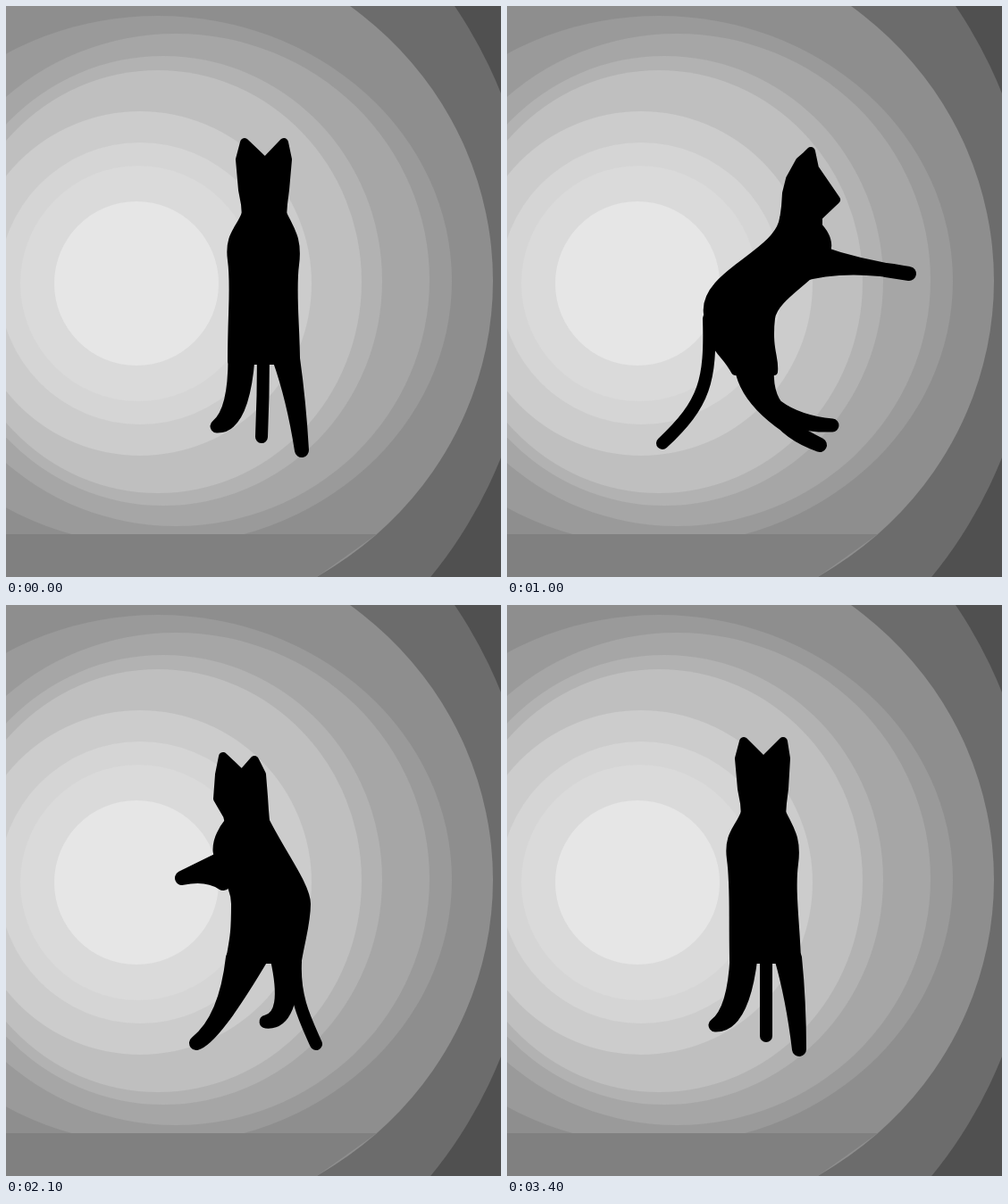
An HTML page without scripts that plays this animation: 554 px wide and 640 px high, repeating every 3500 ms.

```html
<!DOCTYPE html>
<html lang="en">
<head>
<meta charset="utf-8">
<title>Turning cat</title>
<style>
html, body { margin: 0; width: 100%; height: 100%; overflow: hidden; background: #505050; }
svg { display: block; width: 100vw; height: 100vh; }
.cat { fill: #000; stroke: #000; stroke-linejoin: round; stroke-linecap: round; }
/* steps() keeps the 100 ms cadence between poses */
.cat path { animation: 3.5s steps(4) -10ms infinite; }
.cat .head { stroke-width: 10; animation-name: head; }
.cat .torso { stroke-width: 8; animation-name: torso; }
.cat .arm { stroke-width: 16; animation-name: arm; }
.cat .near { stroke-width: 16; animation-name: near; }
.cat .far { stroke-width: 15; animation-name: far; }
.cat .tail { stroke-width: 14; fill: none; animation-name: tail; }

@keyframes head {
  11.4286% { d: path("M293,236 294,222 294,208 298,182 306,154 321,173 337,159 341,182 350,207 335,230 334,242Z"); animation-timing-function: steps(3); }
  20% { d: path("M303,238 305,223 306,209 309,188 318,160 328,170 340,159 342,183 364,212 346,233 346,244Z"); animation-timing-function: steps(3); }
  28.5714% { d: path("M310,240 312,225 313,210 317,194 328,174 335,168 340,163 344,182 368,217 348,236 348,246Z"); }
  40% { d: path("M288,240 288,227 288,214 288,194 294,177 310,190 329,168 332,188 342,217 326,234 324,243Z"); animation-timing-function: steps(1); }
  45.7143% { d: path("M283,240 282,228 282,215 282,195 289,175 305,192 325,171 329,190 330,216 321,233 319,242Z"); animation-timing-function: steps(5); }
  60% { d: path("M250,244 248,236 237,217 239,190 243,170 264,190 278,174 286,190 288,215 289,230 290,242Z"); animation-timing-function: steps(3); }
  68.5714% { d: path("M236,246 234,236 213,214 229,188 236,164 248,178 262,162 271,184 275,209 276,224 278,238Z"); animation-timing-function: steps(2); }
  74.2857% { d: path("M231,246 229,235 206,212 230,187 236,164 241,168 252,158 261,182 268,207 270,222 272,236Z"); animation-timing-function: steps(3); }
  82.8571% { d: path("M232,246 230,234 212,208 231,184 236,161 246,171 254,156 263,180 269,205 270,220 272,236Z"); animation-timing-function: steps(5); }
  97.1429% { d: path("M267,236 266,222 263,206 260,172 265,153 287,175 309,153 312,172 310,206 308,222 307,236Z"); animation-timing-function: steps(1); }
}
@keyframes torso {
  11.4286% { d: path("M293,230C286,272 236,290 234,335S236,375 243,395L322,405C318,385 312,365 313,345S372,262 335,236Z"); animation-timing-function: steps(3); }
  20% { d: path("M302,236C297,274 222,300 227,340S238,380 250,400L309,406C308,390 298,382 302,348S390,282 342,240Z"); animation-timing-function: steps(3); }
  28.5714% { d: path("M309,238C304,278 218,300 224,345S242,385 255,410L299,410C301,395 292,385 296,350S393,288 346,244Z"); }
  40% { d: path("M287,238C278,275 238,285 235,328S238,378 248,400L314,400C314,372 309,352 311,338S354,285 325,242Z"); animation-timing-function: steps(1); }
  45.7143% { d: path("M281,238C274,275 240,280 238,325S240,375 247,398L318,398C318,370 314,350 315,335S348,285 320,242Z"); animation-timing-function: steps(5); }
  60% { d: path("M249,242C215,285 256,300 256,335S254,375 250,398L327,398C332,370 337,355 337,335S310,280 291,242Z"); animation-timing-function: steps(3); }
  68.5714% { d: path("M238,246C196,285 265,315 266,345S261,380 260,402L328,402C338,380 344,360 344,335S298,277 279,236Z"); animation-timing-function: steps(2); }
  74.2857% { d: path("M232,246C186,278 270,306 272,350S266,400 267,418L324,418C332,395 340,380 347,337S282,272 273,233Z"); animation-timing-function: steps(3); }
  82.8571% { d: path("M234,246C185,275 270,305 271,352S266,405 270,428L320,428C326,400 338,377 345,335S278,272 273,232Z"); animation-timing-function: steps(5); }
  97.1429% { d: path("M266,232C260,250 246,256 250,285S252,340 253,398L325,398C324,360 318,320 322,290S316,250 308,232Z"); animation-timing-function: steps(1); }
}
@keyframes arm {
  11.4286% { d: path("M335,278Q385,280 423,281 370,282 325,308Z"); animation-timing-function: steps(3); }
  20% { d: path("M342,272Q395,286 457,292 378,284 325,301Z"); animation-timing-function: steps(3); }
  28.5714% { d: path("M345,275Q395,293 450,300 380,286 325,302Z"); }
  40% { d: path("M332,280Q365,298 391,309 355,294 320,308Z"); animation-timing-function: steps(1); }
  45.7143% { d: path("M325,283Q350,300 368,311 345,298 318,308Z"); animation-timing-function: steps(5); }
  60% { d: path("M250,280Q225,292 197,306 225,300 243,312Z"); animation-timing-function: steps(3); }
  68.5714% { d: path("M240,278Q175,284 133,300 190,286 250,311Z"); animation-timing-function: steps(2); }
  74.2857% { d: path("M236,278Q150,280 116,296 190,280 250,308Z"); animation-timing-function: steps(3); }
  82.8571% { d: path("M232,279Q145,279 126,292 190,277 250,308Z"); animation-timing-function: steps(5); }
  97.1429% { d: path("M286,268Q280,280 275,290 280,295 286,305Z"); animation-timing-function: steps(1); }
}
@keyframes near {
  11.4286% { d: path("M288,400Q322,465 373,495 330,462 318,400Z"); animation-timing-function: steps(3); }
  20% { d: path("M268,400Q300,468 372,494 309,465 302,400Z"); animation-timing-function: steps(3); }
  28.5714% { d: path("M262,400Q266,450 350,492 282,468 290,400Z"); }
  40% { d: path("M252,397Q250,458 302,491 265,455 274,397Z"); animation-timing-function: steps(1); }
  45.7143% { d: path("M251,395Q248,455 283,490 255,450 268,395Z"); animation-timing-function: steps(5); }
  60% { d: path("M254,395Q246,465 213,491 232,486 286,395Z"); animation-timing-function: steps(3); }
  68.5714% { d: path("M262,400Q262,470 204,494 255,490 302,405Z"); animation-timing-function: steps(2); }
  74.2857% { d: path("M270,400Q276,468 212,497 274,474 312,420Z"); animation-timing-function: steps(3); }
  82.8571% { d: path("M280,400Q285,465 237,498 288,466 316,424Z"); animation-timing-function: steps(5); }
  97.1429% { d: path("M307,395Q320,440 327,498 327,445 322,395Z"); animation-timing-function: steps(1); }
}
@keyframes far {
  11.4286% { d: path("M249,400Q256,470 301,471 262,458 272,400Z"); animation-timing-function: steps(3); }
  20% { d: path("M258,400Q268,470 338,471 278,470 288,400Z"); animation-timing-function: steps(3); }
  28.5714% { d: path("M272,400Q285,462 364,470 284,473 292,400Z"); }
  40% { d: path("M284,396Q296,464 362,470 306,462 306,396Z"); animation-timing-function: steps(1); }
  45.7143% { d: path("M290,395Q298,462 354,469 313,458 314,395Z"); animation-timing-function: steps(5); }
  60% { d: path("M303,395Q318,462 291,467 322,470 320,395Z"); animation-timing-function: steps(3); }
  68.5714% { d: path("M290,400Q300,465 246,470 300,472 316,400Z"); animation-timing-function: steps(2); }
  74.2857% { d: path("M280,412Q286,466 223,470 284,472 310,405Z"); animation-timing-function: steps(3); }
  82.8571% { d: path("M274,418Q274,466 206,469 262,470 300,410Z"); animation-timing-function: steps(5); }
  97.1429% { d: path("M257,395Q254,455 233,471 264,472 273,395Z"); animation-timing-function: steps(1); }
}
@keyframes tail {
  11.4286% { d: path("M245,390C246,440 230,460 215,485"); animation-timing-function: steps(3); }
  20% { d: path("M230,355C232,430 222,455 178,490"); animation-timing-function: steps(3); }
  28.5714% { d: path("M226,350C228,420 222,445 174,490"); }
  40% { d: path("M241,385C243,440 236,460 214,491"); animation-timing-function: steps(1); }
  45.7143% { d: path("M248,400C250,450 244,465 234,492"); animation-timing-function: steps(5); }
  60% { d: path("M324,400C322,440 335,465 347,492"); animation-timing-function: steps(3); }
  68.5714% { d: path("M333,370C333,425 345,460 388,491"); animation-timing-function: steps(2); }
  74.2857% { d: path("M341,350C340,430 350,455 400,488"); animation-timing-function: steps(3); }
  82.8571% { d: path("M339,345C339,430 350,450 380,487"); animation-timing-function: steps(5); }
  97.1429% { d: path("M290,390C290,430 290,460 290,483"); animation-timing-function: steps(1); }
}
</style>
</head>
<body>
<svg viewBox="0 0 554 640" preserveAspectRatio="none">
  <rect width="554" height="640" fill="#505050"/>
  <ellipse cx="145" cy="302" rx="448" ry="500" fill="#6c6c6c"/>
  <ellipse cx="145" cy="308" rx="400" ry="385" fill="#8e8e8e"/>
  <ellipse cx="170" cy="308" rx="329" ry="297" fill="#9a9a9a"/>
  <ellipse cx="190" cy="307" rx="284" ry="276" fill="#a6a6a6"/>
  <ellipse cx="176" cy="308" rx="245" ry="252" fill="#b2b2b2"/>
  <ellipse cx="170" cy="309" rx="228" ry="237" fill="#bfbfbf"/>
  <ellipse cx="150" cy="311" rx="192" ry="193" fill="#cccccc"/>
  <circle cx="150" cy="311" r="158" fill="#d5d5d5"/>
  <circle cx="148" cy="311" r="132" fill="#dadada"/>
  <circle cx="146" cy="311" r="92" fill="#e6e6e6"/>
  <path d="M0,592H415L348,640H0Z" fill="#808080"/>
  <g class="cat">
    <path class="tail" d="M288,390C288,430 287,460 286,483"/>
    <path class="far" d="M256,395Q256,455 236,471 265,472 271,395Z"/>
    <path class="near" d="M306,395Q322,440 331,498 328,445 321,395Z"/>
    <path class="arm" d="M288,268Q290,280 295,290 292,295 288,305Z"/>
    <path class="torso" d="M268,232C262,250 248,256 252,285S252,340 252,398L325,398C325,360 320,320 324,290S318,250 310,232Z"/>
    <path class="head" d="M269,236 268,222 265,206 262,172 267,153 290,175 311,153 315,172 312,206 310,222 309,236Z"/>
  </g>
</svg>
</body>
</html>
```
